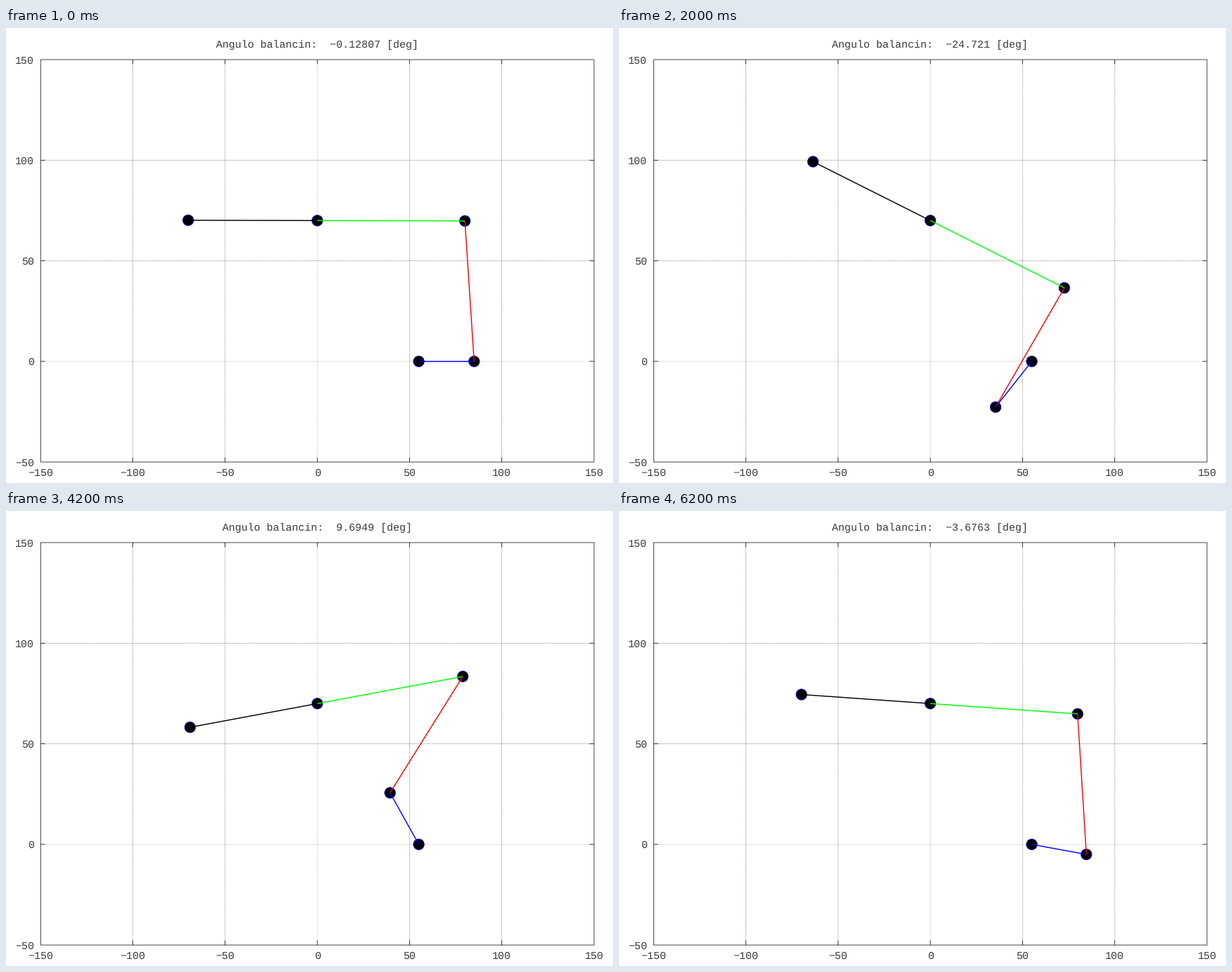
Write a matplotlib script that moves like this. It is 864x648 px and loops after 6300 ms.

```python
import math

import matplotlib.pyplot as plt
from matplotlib.animation import FuncAnimation
from matplotlib.patches import Ellipse

W, H, DPI = 864, 648, 100
PX = 72 / DPI  # points per pixel
LEFT, RIGHT, TOP, BOTTOM = 49.3, 837, 45, 618.1
X0, X1, Y0, Y1 = -150, 150, -50, 150
SX, SY = (RIGHT - LEFT) / (X1 - X0), (BOTTOM - TOP) / (Y1 - Y0)  # pixels per unit
FRAMES, STEP = 63, 0.2  # crank turns 0.2 rad per frame
THIN = 0.72 * PX
INK = "#383838"

CRANK_PIVOT, ROCKER_PIVOT = (55, 0), (0, 70)
CRANK, COUPLER, ROCKER, TAIL = 30, 70, 80, 70

plt.rcParams["text.hinting"] = "none"
fig = plt.figure(figsize=(W / DPI, H / DPI), dpi=DPI, facecolor="white")
ax = fig.add_axes([LEFT / W, 1 - BOTTOM / H, (RIGHT - LEFT) / W, (BOTTOM - TOP) / H])
ax.set(xlim=(X0, X1), ylim=(Y0, Y1))
ax.axis("off")


def stroke(xs=(), ys=(), color="black", lw=THIN, **style):
    style = dict(solid_capstyle="butt", snap=False, clip_on=False) | style
    return ax.plot(xs, ys, color=color, lw=lw, **style)[0]


def put(x, y, text, ha="center"):
    """Text with its baseline at a pixel position measured from the top left."""
    return fig.text(x / W, 1 - y / H, text.replace("-", "\u2212"), ha=ha,
                    va="baseline", family="Liberation Mono",
                    fontsize=15 * PX, color=INK)


def grid_line(xs, ys, value):
    stroke(xs, ys, "#808080" if value == 0 else "#202020", ls=(0, (1, 2)), zorder=1)


tick_x, tick_y = 6.5 / SX, 6.5 / SY
stroke([X0, X1, X1, X0, X0], [Y0, Y0, Y1, Y1, Y0], solid_joinstyle="miter")
for v in range(X0, X1 + 1, 50):
    put(LEFT + (v - X0) * SX, 638, str(v))
    if X0 < v < X1:
        grid_line([v, v], [Y0, Y1], v)
        stroke([v, v], [Y0, Y0 + tick_y])
        stroke([v, v], [Y1, Y1 - tick_y])
for v in range(Y0, Y1 + 1, 50):
    put(40.3, BOTTOM - (v - Y0) * SY + 5.5, str(v), "right")
    if Y0 < v < Y1:
        grid_line([X0, X1], [v, v], v)
        stroke([X0, X0 + tick_x], [v, v])
        stroke([X1, X1 - tick_x], [v, v])

title = put(442.7, 28, "")
joints = [ax.add_patch(Ellipse((0, 0), 15.5 / SX, 15.5 / SY, fc="black",
                               ec="blue", lw=THIN, zorder=3))
          for _ in range(5)]
tail, rocker, coupler, crank = [
    stroke(color=c, lw=2 * THIN, zorder=4) for c in ("black", "lime", "red", "blue")]


def polar(origin, length, angle):
    return (origin[0] + length * math.cos(angle),
            origin[1] + length * math.sin(angle))


def rocker_angle(pin):
    """Angle of the rocker that closes the four-bar loop at the crank pin."""
    dx, dy = pin[0] - ROCKER_PIVOT[0], pin[1] - ROCKER_PIVOT[1]
    d = math.hypot(dx, dy)
    inner = math.acos((ROCKER**2 + d**2 - COUPLER**2) / (2 * ROCKER * d))
    return math.atan2(dy, dx) + inner


def update(i):
    pin = polar(CRANK_PIVOT, CRANK, i * STEP)
    angle = rocker_angle(pin)
    tip = polar(ROCKER_PIVOT, ROCKER, angle)
    end = polar(ROCKER_PIVOT, -TAIL, angle)

    for joint, point in zip(joints, (CRANK_PIVOT, pin, tip, ROCKER_PIVOT, end)):
        joint.center = point
    for line, a, b in ((tail, end, ROCKER_PIVOT), (rocker, ROCKER_PIVOT, tip),
                       (coupler, tip, pin), (crank, pin, CRANK_PIVOT)):
        line.set_data(*zip(a, b))
    label = f"Angulo balancin:  {math.degrees(angle):.5g} [deg]"
    title.set_text(label.replace("-", "\u2212"))
    return *joints, tail, rocker, coupler, crank, title


anim = FuncAnimation(fig, update, frames=FRAMES, interval=100, repeat=True,
                     repeat_delay=0, blit=False)
plt.show()
```
